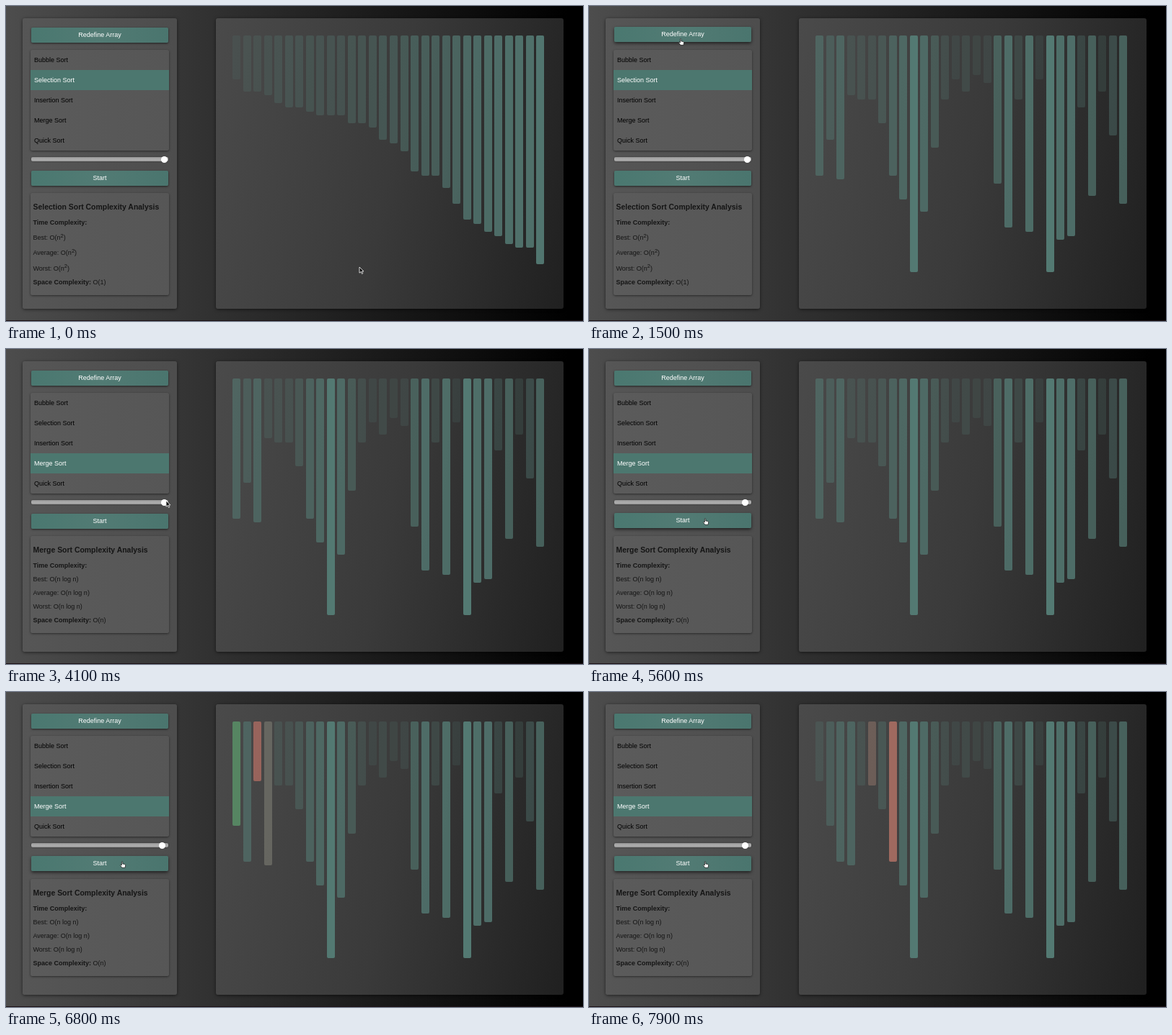
An HTML page that plays this animation: 800x438 px, repeating every 8 s.

```html
<!DOCTYPE html>
<html lang="en">
<head>
<meta charset="utf-8">
<title>Sorting visualizer</title>
<style>
html, body { margin: 0; width: 100%; height: 100%; overflow: hidden; background: #000; }
body { font: 9px/12px "Liberation Sans", Arial, sans-serif; color: #000; }
#stage { position: absolute; width: 800px; height: 438px; overflow: hidden;
  background: linear-gradient(to right, #4d4d4d, #000 780px); }
#stage div, #stage svg { position: absolute; }
.panel, .box { border-radius: 3px; }
.panel { top: 17px; height: 404px; box-shadow: 0 1px 4px rgba(0, 0, 0, .55); }
#side { left: 23px; width: 214px; background: linear-gradient(to right, #565656, #4d4d4d); }
#main { left: 291px; width: 482px; background: linear-gradient(100deg, #4a4a4a, #3a3a3a 50%, #202020); }
.box { left: 34px; width: 192px; background: linear-gradient(to right, #5b5b5b, #565656);
  box-shadow: 0 1px 3px rgba(0, 0, 0, .5); }
#list { top: 61px; height: 140px; }
#info { top: 260px; color: #151515; }
.item { left: 0; width: 187px; height: 28px; padding-left: 5px; line-height: 28px; }
.button { left: 35px; width: 190px; height: 21px; border-radius: 2px; line-height: 21px;
  text-align: center; color: #fff; background: linear-gradient(to right, #4a7870, #527b74 50%, #4a756e); }
#track { left: 35px; top: 210px; width: 190px; height: 6px; border-radius: 2px;
  background: linear-gradient(#909090, #b0b0b0 50%, #999); box-shadow: 0 0 2px rgba(0, 0, 0, .5); }
#thumb { top: 208.5px; width: 9.4px; height: 9.4px; border-radius: 50%; background: #fff; }
.line { left: 3.5px; white-space: nowrap; }
.title { font-size: 10.45px; font-weight: bold; }
.line sup { position: relative; top: -3.5px; font-size: 7.5px; line-height: 0; vertical-align: baseline; }
.bar { top: 40.5px; width: 11px; border-radius: 2px; }
#edge { left: 0; top: 436.6px; width: 800px; height: 2px; background: #1c1116; }
#stage svg { width: 12px; height: 14px; overflow: visible; }
</style>
</head>
<body>
<div id="stage">
  <div id="side" class="panel"></div>
  <div id="main" class="panel"></div>
  <div id="redefine" class="button">Redefine Array</div>
  <div id="list" class="box"></div>
  <div id="track"></div>
  <div id="thumb"></div>
  <div id="start" class="button">Start</div>
  <div id="info" class="box"></div>
  <div id="edge"></div>
  <svg id="arrow"><path d="M0 0V8.2L2 6.4 3.4 9.4 4.8 8.8 3.4 5.9H6Z" fill="#111" stroke="#fff" stroke-width=".8"/></svg>
  <svg id="hand"><path d="M-.6 .4C-.6-.6 .7-.6 .8 .4V3L3.9 3.6Q4.8 3.9 4.7 5L4.1 8.3H-.2L-2.4 5.2Q-2.5 4-1.3 4.4L-.6 5Z" fill="#fff" stroke="#111" stroke-width=".7"/></svg>
</div>
<script>
const LOOP = 8000, FADE = 250, UNIT = 5.58;
const NEW_ARRAY = 1250, PICK_MERGE = 3100;
const TEAL = [84, 122, 115], RED = [255, 107, 92], GREEN = [96, 170, 100];

const sorted = [11, 14, 14, 15, 17, 18, 18, 19, 20, 20, 20, 22, 22, 23, 26,
  27, 29, 34, 35, 35, 38, 42, 46, 47, 49, 50, 52, 53, 53, 57];
const shuffled = [35, 26, 36, 15, 16, 16, 22, 35, 41, 59, 44, 28, 16, 11, 14,
  10, 12, 37, 48, 16, 49, 11, 59, 51, 50, 18, 40, 14, 25, 42];

// Merge results: time, values of the leading bars
const merges = [[6100, [26, 35]], [6600, [26, 35, 15, 36]], [6850, [15, 26, 35, 36]]];

// Highlights: bar, colour, on, off
const marks = [
  [0, GREEN, 5700, 5850], [1, RED, 5750, 5900], [0, RED, 5900, 6140],
  [1, GREEN, 6150, 6350], [2, RED, 6150, 6400],
  [2, GREEN, 6400, 6550], [3, RED, 6400, 6600],
  [0, GREEN, 6650, 6800], [2, RED, 6650, 6800],
  [1, GREEN, 6900, 7110], [2, RED, 6900, 7050],
  [2, GREEN, 7060, 7270], [3, RED, 7050, 7350],
  [4, GREEN, 7350, 7450], [5, RED, 7480, 7740],
  [6, GREEN, 7500, 7620], [7, RED, 7760, 9000]
];

// List rows lit by hover or selection: row, on, off
const lit = [[2, 660, 710], [0, 750, 860], [0, 2200, 2360], [1, -999, PICK_MERGE],
  [2, 2450, 2750], [3, 2750, 9999], [4, 3570, 3690]];

// Pointer: time, x, y
const path = [[100, 490, 363], [970, 127, 46], [2000, 127, 46], [2800, 62, 159],
  [3400, 62, 159], [3900, 222, 211], [4600, 222, 211], [4900, 219, 212],
  [5050, 219, 212], [5450, 161, 236]];

const $ = id => document.getElementById(id);
const clamp = x => Math.max(0, Math.min(1, x));
const smooth = x => x * x * (3 - 2 * x);
const mix = (a, b, k) => a + (b - a) * k;
const glow = (t, on, off) => Math.min(clamp((t - on) / FADE), 1 - clamp((t - off) / FADE));

function add(parent, cls, html = "") {
  const el = document.createElement("div");
  el.className = cls;
  el.innerHTML = html;
  parent.append(el);
  return el;
}

const rows = ["Bubble", "Selection", "Insertion", "Merge", "Quick"].map((name, i) => {
  const el = add($("list"), "item", name + " Sort");
  el.style.top = i * 28 + "px";
  return el;
});

const bars = sorted.map((_, i) => {
  const el = add($("stage"), "bar");
  el.style.left = 314.2 + i * 14.52 + "px";
  return el;
});
$("stage").append($("arrow"), $("hand"));

function report(name, cost, space, centres) {
  const group = add($("info"), "");
  const lines = [name + " Sort Complexity Analysis", "<b>Time Complexity:</b>",
    ...["Best", "Average", "Worst"].map(c => `${c}: O(${cost})`),
    `<b>Space Complexity:</b> O(${space})`];
  lines.forEach((text, i) => {
    add(group, i ? "line" : "line title", text).style.top = centres[i] - 266 + "px";
  });
  return group;
}
const selectionInfo = report("Selection", "n<sup>2</sup>", "1", [280, 301, 322, 343, 364.5, 384]);
const mergeInfo = report("Merge", "n log n", "n", [280, 301, 320, 339, 358, 377]);

function pointerAt(t) {
  const next = path.findIndex(p => p[0] > t);
  if (next < 0) return path[path.length - 1].slice(1);
  if (!next) return path[0].slice(1);
  const [t0, x0, y0] = path[next - 1], [t1, x1, y1] = path[next];
  const k = smooth((t - t0) / (t1 - t0));
  return [mix(x0, x1, k), mix(y0, y1, k)];
}

function valuesAt(t) {
  const values = (t < NEW_ARRAY ? sorted : shuffled).slice();
  for (const [time, head] of merges) {
    if (t >= time) values.splice(0, head.length, ...head);
  }
  return values;
}

function drawBars(t) {
  valuesAt(t).forEach((v, i) => {
    let colour = TEAL, alpha = v / 60;
    for (const [bar, tint, on, off] of marks) {
      if (bar !== i) continue;
      const k = glow(t, on, off);
      colour = colour.map((c, n) => mix(c, tint[n], k));
      alpha = mix(alpha, 1, k);
    }
    bars[i].style.height = v * UNIT + "px";
    bars[i].style.background = `rgba(${colour.map(Math.round)},${alpha})`;
  });
}

function drawButton(id, top, lift) {
  const style = $(id).style;
  style.top = top - lift + "px";
  style.boxShadow = `0 ${1 + lift}px ${3 + lift}px rgba(0,0,0,.6)`;
}

function drawControls(t) {
  const picked = t < PICK_MERGE ? 1 : 3;
  rows.forEach((el, i) => {
    const k = Math.max(0, ...lit.filter(l => l[0] === i).map(l => glow(t, l[1], l[2])));
    el.style.background = `rgba(76,119,111,${k})`;
    el.style.color = i === picked ? "#fff" : "#000";
  });
  selectionInfo.hidden = picked !== 1;
  mergeInfo.hidden = picked !== 3;
  $("info").style.height = (picked === 1 ? 142 : 135) + "px";
  drawButton("redefine", 30, glow(t, 960, 2080));
  drawButton("start", 228.5, glow(t, 5350, 9999));
  $("thumb").style.left = mix(215, 211.8, smooth(clamp((t - 4600) / 300))) + "px";
}

function drawPointer(t) {
  const [x, y] = pointerAt(t);
  const overControl = x > 34 && x < 226 &&
    [[30, 51], [61, 201], [228, 250]].some(([top, end]) => y > top && y < end);
  $("arrow").style.display = overControl ? "none" : "";
  $("hand").style.display = overControl ? "" : "none";
  for (const id of ["arrow", "hand"]) $(id).style.transform = `translate(${x}px,${y}px)`;
  for (const id of ["arrow", "hand"]) $(id).style.left = $(id).style.top = "0";
}

const began = performance.now();
function draw() {
  const t = (performance.now() - began) % LOOP;
  drawBars(t);
  drawControls(t);
  drawPointer(t);
  requestAnimationFrame(draw);
}
draw();
</script>
</body>
</html>
```
